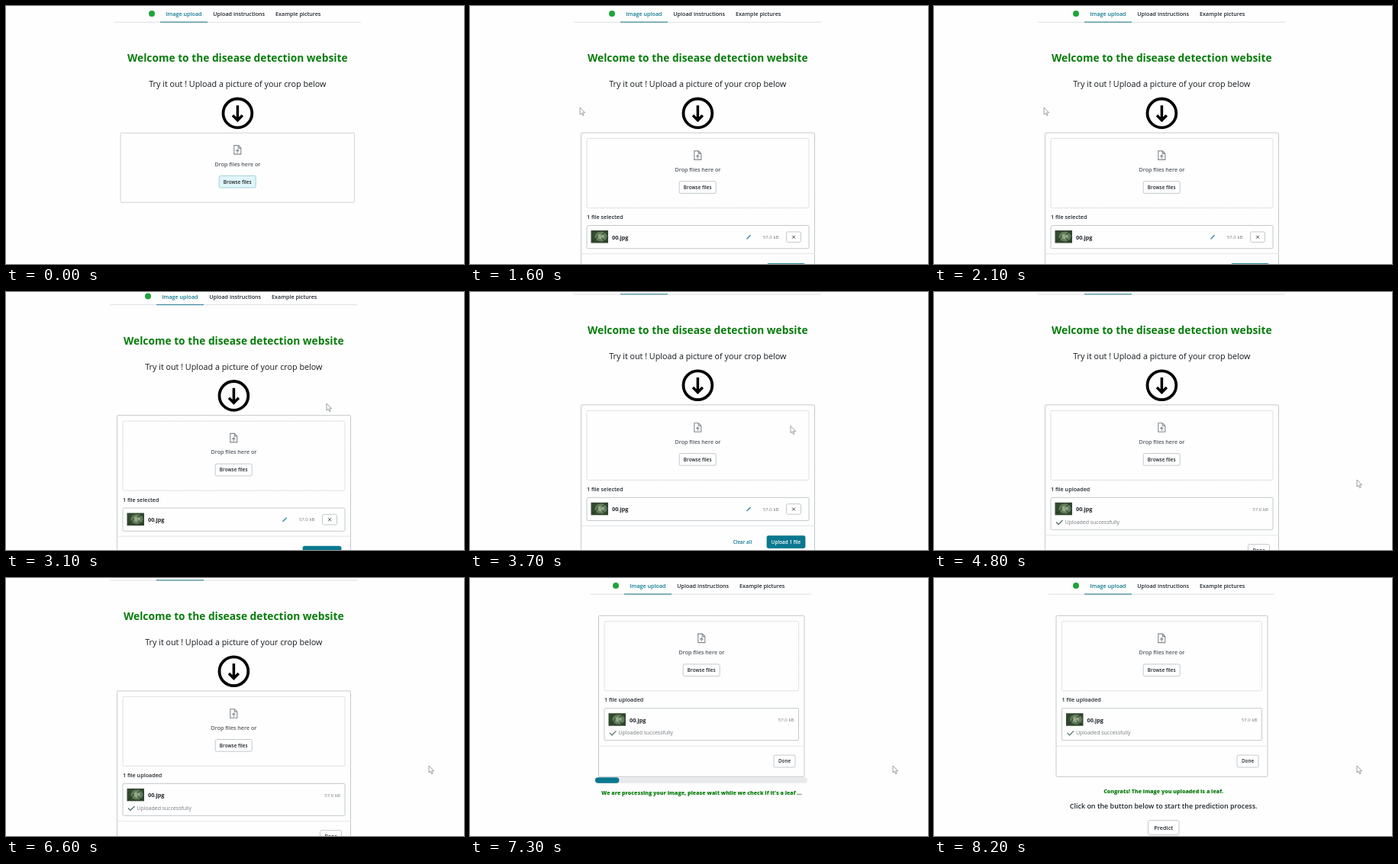
An HTML page that plays this animation: 600 by 338 pixels, repeating every 8.6 s.

```html
<!DOCTYPE html>
<html lang="en">
<head>
<meta charset="utf-8">
<title>Disease detection upload</title>
<style>
html, body { margin: 0; width: 100%; height: 100%; overflow: hidden; background: #fefefe; }
svg { display: block; width: 600px; height: 338px; font-family: "Open Sans", "Noto Sans", sans-serif; }
</style>
</head>
<body>
<svg id="stage" viewBox="0 0 600 338"></svg>
<script>
const LOOP = 8600, STEP = 100;
const INK = '#20262c', TEAL = '#0b7890', GREEN = '#087d0c', GREY = '#747a7f';
const stage = document.getElementById('stage');

// [time, x, y] of the pointer tip and [time, offset] of the page scroll
const pointerKeys = [
  [1600, 144, 133], [2500, 144, 133], [2600, 250, 128], [2700, 380, 131], [2800, 420, 146],
  [3600, 420, 146], [3800, 420, 205], [4000, 422, 290], [4200, 423, 327], [4400, 423, 327],
  [4500, 452, 300], [4600, 500, 270], [4700, 542, 252], [4800, 554, 246]
];
const scrollKeys = [[3000, 0], [3100, 4.5], [3200, 10.5], [3300, 15], [3400, 17.4], [3500, 18.2]];

function track(keys, t) {
  const next = keys.findIndex(k => k[0] > t);
  if (next < 0) return keys[keys.length - 1].slice(1);
  if (next === 0) return keys[0].slice(1);
  const a = keys[next - 1], b = keys[next], p = (t - a[0]) / (b[0] - a[0]);
  return a.slice(1).map((v, i) => v + (b[i + 1] - v) * p);
}

// y is the optical middle of the line
const text = (s, x, y, size, fill = INK, weight = 600, anchor = 'middle') =>
  `<text x="${x}" y="${y + size * .36}" font-size="${size}" fill="${fill}" font-weight="${weight}" text-anchor="${anchor}">${s}</text>`;
const rect = (x, y, w, h, fill = 'none', stroke = 'none', rx = 1.5, extra = '') =>
  `<rect x="${x}" y="${y}" width="${w}" height="${h}" rx="${rx}" fill="${fill}" stroke="${stroke}" ${extra}/>`;
const path = (d, stroke, width = 1, fill = 'none') =>
  `<path d="${d}" stroke="${stroke}" stroke-width="${width}" fill="${fill}"/>`;
const button = (label, x, y, w, h = 16, size = 6.3, fill = '#fff', stroke = '#b4bbc0', ink = INK) =>
  rect(x, y, w, h, fill, stroke, 2, 'stroke-width=".8"') + text(label, x + w / 2, y + h / 2, size, ink);

function tabs(cx, left, right) {
  return path(`M${left} 21.2H${right}`, '#dcdfe1') +
    path(`M${cx - 101} 21.1h62`, '#438c9e', 1.2) +
    `<circle cx="${cx - 112}" cy="10" r="4" fill="#1fa33c"/>` +
    text('Image upload', cx - 70, 10.6, 7.17, TEAL) +
    text('Upload instructions', cx + 2.2, 10.6, 7.17) +
    text('Example pictures', cx + 79.7, 10.6, 7.17);
}

function intro(cx) {
  return text('Welcome to the disease detection website', cx + .3, 68.4, 13.75, GREEN, 700) +
    text('Try it out ! Upload a picture of your crop below', cx + .3, 102.4, 10.78, '#15191d', 500) +
    `<circle cx="${cx + .4}" cy="140.4" r="18.9" fill="none" stroke="#000" stroke-width="3.8"/>` +
    path(`M${cx + .4} 130.2v19m-6.4-5.9l6.4 6.4l6.4-6.4`, '#000', 3.5);
}

function dropZone(cx, y, left, right, hover) {
  const icon = `M${cx - 4.2} ${y + 16.3}h5.5l3.5 3.5v8h-9zM${cx + 1.3} ${y + 16.3}v3.5h3.5` +
    `M${cx + .3} ${y + 26.3}v-4.5m-2 2l2-2l2 2`;
  return rect(left, y, right - left, 91, 'none', '#c6cbce', 1.5, `stroke-width=".8" ${hover ? '' : 'stroke-dasharray="1.5 .7"'}`) +
    path(icon, '#81888e', 1.1) +
    text('Drop files here or', cx + .4, y + 40.7, 7.15, '#535960') +
    (hover ? button('Browse files', cx - 23.8, y + 56.1, 48, 15.7, 6.35, '#e0f5fa', '#8cc9d6')
           : button('Browse files', cx - 23.8, y + 56.1, 48, 15.7, 6.35));
}

function photo(x, y) {
  const cx = x + 13, cy = y + 8;
  return rect(x, y, 22.5, 16.5, '#33482f', 'none', 0) +
    `<ellipse cx="${cx}" cy="${cy}" rx="8" ry="6.5" fill="#5f7c5a"/>` +
    `<ellipse cx="${cx}" cy="${cy}" rx="4.2" ry="3.6" fill="#94a888"/>` +
    path(`M${x + 1} ${y + 14}q6-1 8-7m12 8q-5-1-7-6m6-8q-2 3-7 5`, '#22331f', .9);
}

function card(cx, y, left, right, done, hover) {
  const l = left + 7.5, r = right - 7.5, row = y + 121.4, foot = y + (done ? 170.8 : 158.4);
  let out = rect(left, y, right - left, done ? 211 : 198.5, 'none', '#bfc4c7', 1.5, 'stroke-width=".9"') +
    dropZone(cx, y + 7.5, l, r) +
    text(done ? '1 file uploaded' : '1 file selected', l, y + 110.5, 7.2, INK, 600, 'start') +
    rect(l, row, r - l, done ? 42 : 30.2, 'none', '#bfc4c7', 1.5, 'stroke-width=".9"') +
    photo(l + 5.5, row + 6.5) +
    text('00.jpg', l + 33, row + 15.4, 7.3, INK, 700, 'start') +
    text('57.0 kB', r - (done ? 6 : 39.5), row + 15.2, 6.05, GREY, 400, 'end') +
    path(`M${left} ${foot}H${right}`, '#e2e5e7');
  if (done) return out +
    path(`M${l + 7} ${row + 32.2}l3 3l5.5-5.5`, '#4d6b66', 1.2) +
    text('Uploaded successfully', l + 18.5, row + 32, 6.95, GREY, 400, 'start') +
    button('Done', right - 40, y + 182.7, 28);
  return out +
    path(`M${r - 81.5} ${row + 17.7}l5-5`, '#2b8fa3', 1.5) +
    button('', r - 29.5, row + 8.4, 19, 13.5) +
    path(`M${r - 22} ${row + 13.2}l4 4m0-4l-4 4`, INK, .8) +
    text('Clear all', right - 94.5, y + 179.5, 6.25, TEAL) +
    button('Upload 1 file', right - 62.5, y + 171.5, 50, 16, 6.4,
      hover ? '#0c4a5b' : TEAL, hover ? '#0c4a5b' : TEAL, '#fff');
}

function progress(share) {
  return rect(164, 261.3, 278, 7.4, '#e8e9ea', 'none', 3.7) +
    rect(164, 261.3, 278 * share, 7.4, TEAL, 'none', 3.7) +
    text("We are processing your image, please wait while we check if it's a leaf ...", 303.3, 281, 7.05, GREEN, 800);
}

function pointer([x, y]) {
  return path(`M${x} ${y}v9.2l2.1-1.9l1.5 3.4l1.5-.7l-1.5-3.2h3z`, '#7d8286', .75, '#fff');
}

function scene(t) {
  if (t < 1600) return tabs(303, 141, 465) + intro(303) + dropZone(303, 166.3, 150, 456.5, true);
  const tip = track(pointerKeys, t);
  let page;
  if (t < 6700) {
    const form = tabs(298, 136, 460) + intro(298) +
      card(298, 166.1, 145.5, 451.5, t >= 4500, t < 4500 && tip[1] > 318);
    page = `<g transform="translate(0 ${-track(scrollKeys, t)[0]})">${form}</g>`;
  } else if (t < 8100) {
    const share = t < 7300 ? .11 + (t - 6700) * .00277 : .113 + (t - 7300) * .00127;
    page = tabs(303, 158, 447) + card(303, 49.3, 168.5, 438, true) + progress(Math.min(1, share));
  } else {
    page = tabs(298, 150, 446) + card(298, 49.3, 160, 437, true) +
      text('Congrats! The image you uploaded is a leaf.', 300.7, 279, 7.05, GREEN, 800) +
      text('Click on the button below to start the prediction process.', 300.7, 298.5, 8.98) +
      button('Predict', 280.5, 317.5, 40.5, 19, 7.3);
  }
  return page + pointer(tip);
}

let shown = -1;
function draw(now) {
  const t = Math.floor(now % LOOP / STEP) * STEP;
  if (t !== shown) stage.innerHTML = scene(shown = t);
  requestAnimationFrame(() => draw(performance.now()));
}
draw(performance.now());
</script>
</body>
</html>
```
